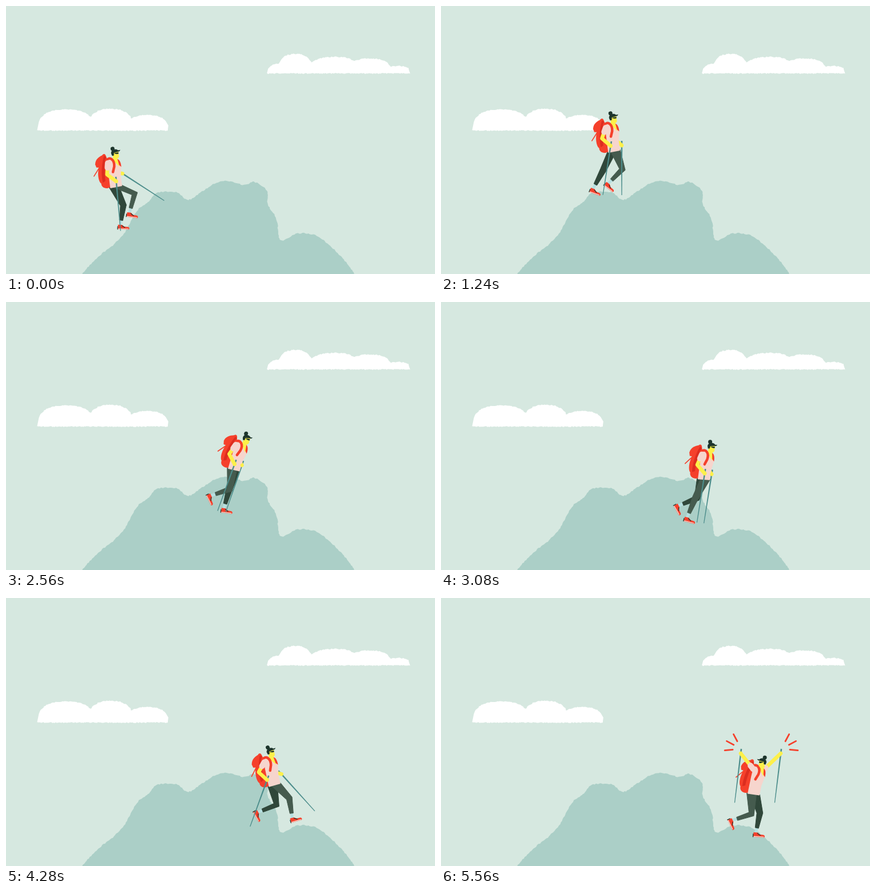
An HTML page with a canvas that plays this animation: 750 by 469 pixels, repeating every 6.44 s.

```html
<!DOCTYPE html>
<html lang="en">
<head>
<meta charset="utf-8">
<title>Mountain hiker</title>
<style>
  html, body { margin: 0; width: 100%; height: 100%; overflow: hidden; background: #d6e8e0; }
  canvas { display: block; width: 750px; height: 469px; }
</style>
</head>
<body>
<canvas id="stage" width="750" height="469"></canvas>
<script>
const ctx = document.getElementById('stage').getContext('2d');
const LOOP = 6440, CHEER = 4960, POLE = 95, LEG = 35.5, ARM = 20, RAD = Math.PI / 180;
const C = {
  sky: '#d6e8e0', hill: '#abcfc7', cloud: '#ffffff', red: '#f5402b', deep: '#dc2d1f',
  pink: '#f6d5cd', skin: '#fdf04a', hair: '#1d352c', near: '#455b4e', far: '#30473a',
  sock: '#b6dfe0', pole: '#4c8d8b'
};

// Moments at which the drawing changes
const steps = [0, 160, 240, 440, 600, 800, 1000, 1240, 1320, 1400, 1560, 1720, 1960, 2200,
  2400, 2560, 2720, 2840, 2960, 3080, 3320, 3560, 3920, 4040, 4120, 4280, 4440, 4520,
  4720, 4960, 5120, 5320, 5560];

// time, hip x, y, lean, stride phase of each leg, swing of each pole (degrees)
const keys = [
  [0, 192, 316, -11, 37, -65, 5, 57],
  [800, 264, 253, -6, -160, -340, 10, 22],
  [1240, 302, 254, -11, -270, -489, -9, 0],
  [1720, 340, 271, 0, -441, -580, -18, 6],
  [2560, 398, 293, 13, -584, -820, -20, -19],
  [3080, 459, 310, 4, -837, -935, -9, -9],
  [3560, 455, 328, 2, -920, -1090, -47, 25],
  [4280, 469, 327, -16, -1088, -1323, -20, 42],
  [CHEER, 546, 343, 8, -1310, -1510, -30, 95]
];

function poseAt(t) {
  let i = keys.length - 1;
  while (keys[i][0] > t) i--;
  const a = keys[i], b = keys[i + 1];
  if (!b) return a.slice(1);
  const k = (t - a[0]) / (b[0] - a[0]);
  return mix(a, b, k).slice(1);
}

// Vectors
const mix = (p, q, k) => p.map((n, i) => n + (q[i] - n) * k);
const along = (p, d, n) => [p[0] + d[0] * n, p[1] + d[1] * n];
const side = d => [d[1], -d[0]];
const dist = (p, q) => Math.hypot(q[0] - p[0], q[1] - p[1]);
function unit(p, q) {
  const d = dist(p, q) || 1;
  return [(q[0] - p[0]) / d, (q[1] - p[1]) / d];
}
function turn([x, y], deg) {
  const c = Math.cos(deg * RAD), s = Math.sin(deg * RAD);
  return [x * c - y * s, x * s + y * c];
}
// Middle joint of a limb with two bones of equal length
function joint(a, b, bone, bend) {
  const h = Math.sqrt(Math.max(0, bone ** 2 - (dist(a, b) / 2) ** 2));
  return along(mix(a, b, 0.5), side(unit(a, b)), h * bend);
}

// Drawing helpers
const poly = pts => 'M' + pts.map(p => p.join(' ')).join('L') + 'Z';
function fill(color, path) {
  ctx.fillStyle = color;
  ctx.fill(new Path2D(path));
}
function line(color, width, path) {
  ctx.strokeStyle = color;
  ctx.lineWidth = width;
  ctx.lineCap = ctx.lineJoin = 'round';
  ctx.stroke(new Path2D(path));
}
function dot(color, [x, y], r) {
  ctx.fillStyle = color;
  ctx.beginPath();
  ctx.arc(x, y, r, 0, 7);
  ctx.fill();
}

// Scenery with a torn-paper edge
function torn(pts, seed) {
  const rnd = () => (seed = (seed * 16807) % 2147483647) / 2147483647 - 0.5;
  return poly(pts.map(([x, y]) => [x + rnd() * 1.5, y + rnd() * 1.7]));
}

function spline(p) {
  const out = [];
  for (let i = 1; i < p.length - 2; i++) {
    const [a, b, c, d] = p.slice(i - 1, i + 3);
    const n = Math.ceil(dist(b, c) / 3);
    for (let j = 0; j < n; j++) {
      const k = j / n;
      out.push(b.map((v, m) => v + k / 2 * (c[m] - a[m] + k * (2 * a[m] - 5 * v + 4 * c[m] - d[m]
        + k * (3 * (v - c[m]) + d[m] - a[m])))));
    }
  }
  return out;
}

// A flat base with rounded bumps: centre, half width, height
function cloud(left, right, base, bumps) {
  const top = [], bottom = [];
  for (let x = left; x <= right; x += 2) {
    const rise = bumps.map(([cx, w, h]) => h * Math.max(0, 1 - Math.abs((x - cx) / w) ** 2.5) ** 0.4);
    top.push([x, base - Math.max(...rise)]);
    bottom.unshift([x, base]);
  }
  return [...top, ...bottom];
}

const hill = torn(spline([[100, 510], [120, 485], [133, 469], [162, 438], [201, 405], [228, 360],
  [250, 342], [264, 327], [297, 326], [319, 339], [345, 323], [378, 306], [416, 313], [434, 308],
  [456, 323], [458, 348], [473, 373], [480, 410], [510, 398], [546, 404], [586, 439], [611, 470],
  [630, 485], [650, 500]]), 11);
const clouds = [
  torn(cloud(55, 284, 218, [[105, 50, 37], [183, 40, 38], [247, 37, 27]]), 5),
  torn(cloud(457, 707, 118, [[482, 25, 17], [506, 31, 34], [574, 46, 29], [636, 38, 26], [685, 22, 13]]), 8)
];

// Ground stroke below, low-passing swing above
function stride(phase) {
  const c = Math.cos(phase * RAD), s = Math.sin(phase * RAD);
  return [-10 + 42 * c, 57 - (s > 0 ? 22 * s * Math.abs(c) : 12 * s)];
}

function drawFoot([x, y], angle) {
  ctx.save();
  ctx.translate(x, y);
  ctx.rotate(angle);
  fill(C.red, 'M-4-1L3-1L7 2L14 2.5C17 4 16 6 15 7L-4 7Z');
  line(C.pink, 1.3, 'M-3 6.2L14 6');
  line(C.hair, 1.2, 'M-4.5 2L-4.500 7M3 0.500L8 3.500');
  ctx.restore();
}

function drawLeg(color, phase, shift, lean) {
  const u = turn([1, 0], lean), hip = along([0, 0], u, shift);
  const ankle = stride(phase), knee = joint([0, 0], ankle, LEG, 1);
  const shin = unit(knee, ankle), n = side(unit(hip, ankle)), m = side(shin);
  const cuff = along(ankle, shin, -9);
  line(C.sock, 5, 'M' + cuff + 'L' + ankle);
  drawFoot(ankle, Math.atan2(-shin[0], shin[1]) - 8 * RAD);
  const shape = poly([along(hip, u, -8.5), along(knee, n, -5.5), along(cuff, m, -3),
    along(cuff, m, 3), along(knee, n, 5), along(hip, u, 8.5)]);
  fill(color, shape);
  line(color, 1, shape);
}

// Returns the place of the gripping hand
function drawPole(top, angle) {
  const d = turn([0, 1], -angle), n = side(d), tip = along(top, d, POLE);
  fill(C.pole, poly([along(top, n, -1.3), along(tip, n, -0.6), along(tip, n, 0.6), along(top, n, 1.3)]));
  return along(top, d, 8);
}

function drawArm(shoulder, hand, bend) {
  const elbow = joint(shoulder, hand, ARM, bend);
  line(C.skin, 6.5, 'M' + shoulder + 'L' + elbow + 'L' + hand);
  line(C.pink, 10, 'M' + shoulder + 'L' + along(shoulder, unit(shoulder, elbow), 8));
}

function drawTorso() {
  line(C.red, 1.6, 'M-21-39L-34-25M-13-57C-9-62-7-58-7-50');
  fill(C.red, 'M-22-40C-28-28-28-14-24-10C-25-4-20 0-14 0L-4-2L2-46L-10-54Z');
  fill(C.red, 'M-28-45C-26-54-18-58-8-59L-6-50L-11-36L-27-39Z');
  fill(C.deep, 'M-10-57C-17-42-21-28-21-11L-16-13C-15-28-12-42-7-54Z');
  fill(C.pink, 'M-6-50L6-49L15-45L16-33L12-16L11 1L-10 1L-8-30Z');
  fill(C.red, 'M9-48C15-47 17-41 16-32L12-37Z');
  fill(C.skin, 'M5-54L12-52L12-46L13-33L4-46Z');
  line(C.red, 4.5, 'M-8-48C0-55 7-46 4-35L0-26');
}

function drawHead(flip) {
  ctx.save();
  if (flip) {
    ctx.translate(18, 0);
    ctx.scale(-1, 1);
  }
  fill(C.skin, 'M6-60L16-60L15.500-50L12-47L5-48Z');
  dot(C.hair, [7, -66], 3.5);
  fill(C.hair, 'M3-58C3-65 13-66 16-61.500L20-61.500L18-59.500L8-58.500L7-54L4-54Z');
  fill(C.hair, 'M9-58L16-58L15.500-55.500L12-55.500L11-56.500L9-56.500Z');
  ctx.restore();
}

function drawSparks([x, y], dir, length) {
  for (const deg of [5, -28, -62]) {
    const ray = turn([1, 0], deg), d = [ray[0] * dir, ray[1]];
    line(C.red, 2.8, 'M' + along([x, y], d, 15) + 'L' + along([x, y], d, 15 + length));
  }
}

function drawScene(step) {
  const t = steps[step], cheer = t >= CHEER, up = step % 2 === 0;
  const [x, y, lean, a, b, nearSwing, farSwing] = poseAt(t);
  const shift = Math.max(-3, Math.min(3, (stride(a)[0] - stride(b)[0]) / 3));

  let nearTop = along(turn([0, -18], lean * 1.6), [1, 0], 4 + nearSwing * 0.3);
  let farTop = [14 - farSwing * 0.16, -18 - farSwing * 0.16];
  if (cheer) {
    const h = up ? -79 : -66;
    nearTop = [-21, h];
    farTop = [49, h];
  }

  fill(C.sky, 'M0 0H750V469H0Z');
  clouds.forEach(c => fill(C.cloud, c));
  fill(C.hill, hill);

  ctx.save();
  ctx.translate(x, y);
  drawLeg(C.far, b, -shift, lean);
  drawLeg(C.near, a, shift, lean);
  const farHand = drawPole(farTop, cheer ? -7 : farSwing);
  drawArm(turn([10, -42], lean), farHand, cheer ? 0 : -1);
  ctx.save();
  ctx.rotate(lean * RAD);
  drawTorso();
  drawHead(cheer);
  ctx.restore();
  dot(C.skin, farHand, 2.8);
  const nearHand = drawPole(nearTop, cheer ? -7 : nearSwing);
  drawArm(turn([-6, -43], lean), nearHand, cheer ? 0 : -1);
  dot(C.skin, nearHand, 3.2);
  if (cheer) {
    drawSparks(nearTop, -1, up ? 14 : 7);
    drawSparks(farTop, 1, up ? 14 : 7);
  }
  ctx.restore();
}

const start = performance.now();
let shown = -1;
function tick() {
  const t = (performance.now() - start) % LOOP;
  let i = steps.length - 1;
  while (steps[i] > t) i--;
  if (i !== shown) drawScene(shown = i);
  requestAnimationFrame(tick);
}
tick();
</script>
</body>
</html>
```
